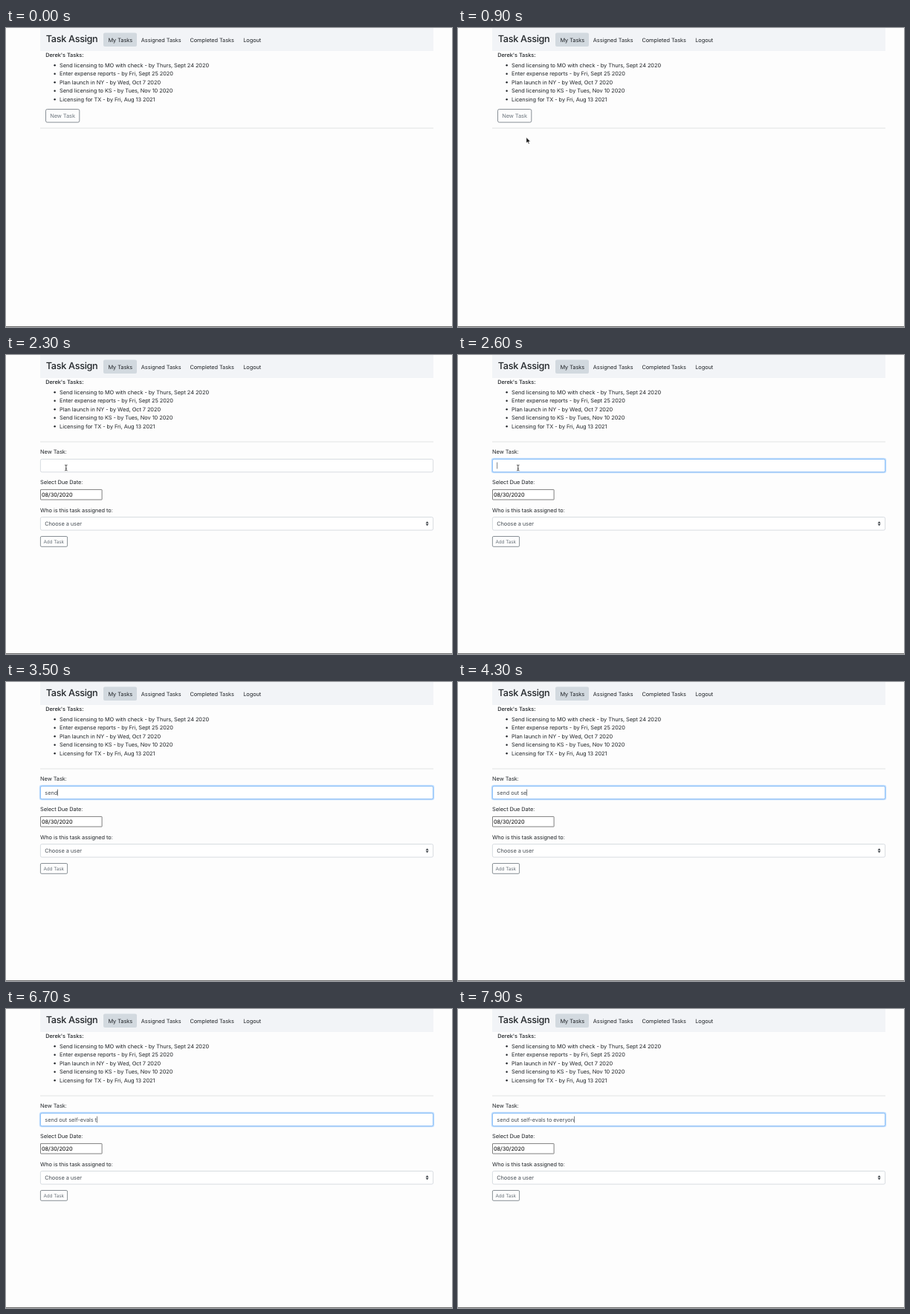
Recreate the animation shown at these times as an HTML page. Size 600 px wide and 403 px high, loop 8 s.

```html
<!DOCTYPE html>
<html lang="en">
<head>
<meta charset="utf-8">
<title>Task list</title>
<style>
  html, body { margin: 0; width: 100%; height: 100%; overflow: hidden; background: #fdfdfd; }
  svg { display: block; width: 100vw; height: 100vh; }
  text {
    font: 7.4px Inter, "Open Sans", sans-serif;
    letter-spacing: -.065px;
    fill: #212529;
    text-rendering: geometricPrecision;
  }
  .brand { font-size: 12.7px; font-weight: 500; letter-spacing: -.33px; }
  .strong { font-weight: 500; }
  .small { font-size: 6.4px; }
  .muted { fill: #6c757d; }
  .field { fill: #495057; }
  .box { fill: #fff; stroke: #ced4da; stroke-width: .8; }
  .button { fill: #fdfdfd; stroke: #6c757d; stroke-width: .8; }
</style>
</head>
<body>
<svg viewBox="0 0 600 403">
  <rect width="600" height="403" fill="#fdfdfd"/>
  <rect x="46" width="529" height="31" fill="#f2f4f7"/>
  <rect x="131" y="6.5" width="45" height="18.5" rx="2" fill="#d2d9df"/>
  <text class="brand" x="53.8" y="18.6">Task Assign</text>
  <g id="nav"></g>
  <text class="strong" x="53.3" y="38.5">Derek's Tasks:</text>
  <g id="list"></g>
  <rect id="rule" x="46" width="529" height="1" fill="#e2e3e4"/>

  <g id="newTask">
    <rect id="buttonRing" x="52.2" y="108.3" width="48" height="20" rx="3" fill="#bfc3c7"/>
    <rect class="button" x="53.5" y="109.5" width="45.3" height="17.6" rx="2"/>
    <rect id="buttonFill" x="53.1" y="109.1" width="46.1" height="18.4" rx="2"/>
    <text id="buttonText" x="59.2" y="120.9">New Task</text>
  </g>

  <g id="form">
    <text x="46.1" y="133.2">New Task:</text>
    <rect id="inputRing" x="44.8" y="138.8" width="531.4" height="20.4" rx="3" fill="#bfdeff"/>
    <rect class="box" x="46.4" y="140.4" width="528.2" height="17.4" rx="2"/>
    <rect id="inputEdge" x="46.4" y="140.4" width="528.2" height="17.4" rx="2"
          fill="none" stroke="#80bdff" stroke-width=".9"/>
    <text id="typed" class="field" x="52.3" y="151.8"></text>
    <rect id="caret" y="144.6" width=".7" height="8.8" fill="#495057"/>
    <text x="46.1" y="174.4">Select Due Date:</text>
    <rect x="46.5" y="181.4" width="82.6" height="13.6" rx=".5" fill="#fff" stroke="#606060" stroke-width=".8"/>
    <text x="48" y="190.9" style="fill:#000">08/30/2020</text>
    <text x="46.1" y="211.5">Who is this task assigned to:</text>
    <rect class="box" x="46.4" y="218.5" width="528.2" height="17.6" rx="2"/>
    <text class="field" x="52.2" y="229.9">Choose a user</text>
    <path d="M564.6 226.7h4l-2-2.4zM564.6 227.8h4l-2 2.4z" fill="#343a40"/>
    <rect class="button" x="46.4" y="244.5" width="36.2" height="13.8" rx="1.5"/>
    <text class="small muted" x="50.4" y="253.7">Add Task</text>
  </g>

  <rect y="402" width="600" height="1" fill="#6a6a6a"/>

  <g id="cursor">
    <path id="arrow" d="M0 0V7.6L1.8 6l1.2 2.8 1.2-.5L3 5.6h2.4z" fill="#111" stroke="#fff" stroke-width=".5"/>
    <path id="hand" d="M-.7 .3Q0-.6.7.3V2.4L3 3Q4 3.2 3.8 4.4L3.2 7.2H-.4L-2.3 4.3Q-2 3.4-.7 4.4z"
          fill="#fff" stroke="#111" stroke-width=".7"/>
    <path id="beam" d="M-1.7-3.8Q0-3.8 0-2.8Q0-3.8 1.7-3.8M0-2.8V2.8M-1.7 3.8Q0 3.8 0 2.8Q0 3.8 1.7 3.8M-.8 1.2H.8"
          fill="none" stroke="#222" stroke-width=".8"/>
  </g>
</svg>

<script>
const LOOP = 8000, STEP = 100;
const HOVER = 1100, PRESS = 1400, OPEN = 1500, FOCUS = 2500;
const MESSAGE = 'send out self-evals to everyon';

// [time in ms, characters visible from then on]
const TYPING = [
  [3000, 1], [3200, 2], [3400, 3], [3500, 4], [3600, 5], [3800, 6], [3900, 7],
  [4000, 9], [4200, 10], [4300, 11], [4600, 12], [5000, 13], [5500, 14],
  [5600, 15], [5800, 16], [5900, 17], [6100, 18], [6300, 19], [6500, 20],
  [6700, 21], [6800, 22], [6900, 23], [7000, 24], [7200, 25], [7400, 27],
  [7600, 28], [7800, 29], [7900, 30]
];

// [time in ms, x, y]
const POINTER = [[300, 152, 314], [1100, 80.8, 116.6], [2000, 80.8, 116.6], [2300, 80.8, 152]];

const $ = id => document.getElementById(id);
const show = (id, on) => { $(id).style.display = on ? '' : 'none'; };
const clamp = v => Math.min(1, Math.max(0, v));
const ease = p => p * p * (3 - 2 * p);

$('nav').innerHTML = [['My Tasks', 137.4], ['Assigned Tasks', 181.8], ['Completed Tasks', 247.4], ['Logout', 319.2]]
  .map(([label, x]) => `<text x="${x}" y="18.5">${label}</text>`).join('');

$('list').innerHTML = [
  'Send licensing to MO with check - by Thurs, Sept 24 2020',
  'Enter expense reports - by Fri, Sept 25 2020',
  'Plan launch in NY - by Wed, Oct 7 2020',
  'Send licensing to KS - by Tues, Nov 10 2020',
  'Licensing for TX - by Fri, Aug 13 2021'
].map((task, i) => {
  const y = 52.7 + i * 11.5;
  return `<circle cx="65.6" cy="${y - 2.4}" r="1.2" fill="#212529"/><text x="72.1" y="${y}">${task}</text>`;
}).join('');

function pointerAt(t) {
  const next = POINTER.findIndex(k => k[0] > t);
  if (next < 0) return POINTER.at(-1).slice(1);
  const [t0, x0, y0] = POINTER[Math.max(0, next - 1)];
  const [t1, x1, y1] = POINTER[next];
  const p = ease(clamp((t - t0) / (t1 - t0 || 1)));
  return [x0 + (x1 - x0) * p, y0 + (y1 - y0) * p];
}

function drawButton(t) {
  const hover = clamp((t - HOVER + STEP) / 200);
  show('newTask', t < OPEN);
  show('buttonRing', t >= PRESS);
  $('buttonFill').setAttribute('fill', t >= PRESS ? '#5a6268' : '#6c757d');
  $('buttonFill').setAttribute('opacity', hover);
  $('buttonText').style.fill = hover ? '#fff' : '#6c757d';
}

function drawInput(t) {
  const focus = clamp((t - FOCUS + STEP) / 200);
  show('form', t >= OPEN);
  $('inputRing').setAttribute('opacity', focus);
  $('inputEdge').setAttribute('opacity', focus);
  show('caret', t >= FOCUS);
  const count = TYPING.reduce((n, [at, chars]) => t >= at ? chars : n, 0);
  const typed = $('typed');
  // Non-breaking spaces keep a trailing space in the measured width.
  typed.textContent = MESSAGE.slice(0, count).replace(/ /g, '\u00a0');
  const width = count && t >= OPEN ? typed.getComputedTextLength() : 0;
  $('caret').setAttribute('x', 52.4 + width);
}

function drawCursor(t) {
  const [x, y] = pointerAt(t);
  const onButton = t < OPEN && y < 127;
  const onInput = t >= OPEN && y > 140;
  show('cursor', t >= 300 && t < 3100);
  show('hand', onButton);
  show('beam', onInput);
  show('arrow', !onButton && !onInput);
  $('cursor').setAttribute('transform', `translate(${x} ${y})`);
}

function render(t) {
  $('rule').setAttribute('y', t < OPEN ? 134.5 : 116.5);
  drawButton(t);
  drawInput(t);
  drawCursor(t);
}

const start = performance.now();
function frame() {
  const t = (performance.now() - start) % LOOP;
  render(Math.floor(t / STEP) * STEP);
  requestAnimationFrame(frame);
}
frame();
</script>
</body>
</html>
```
